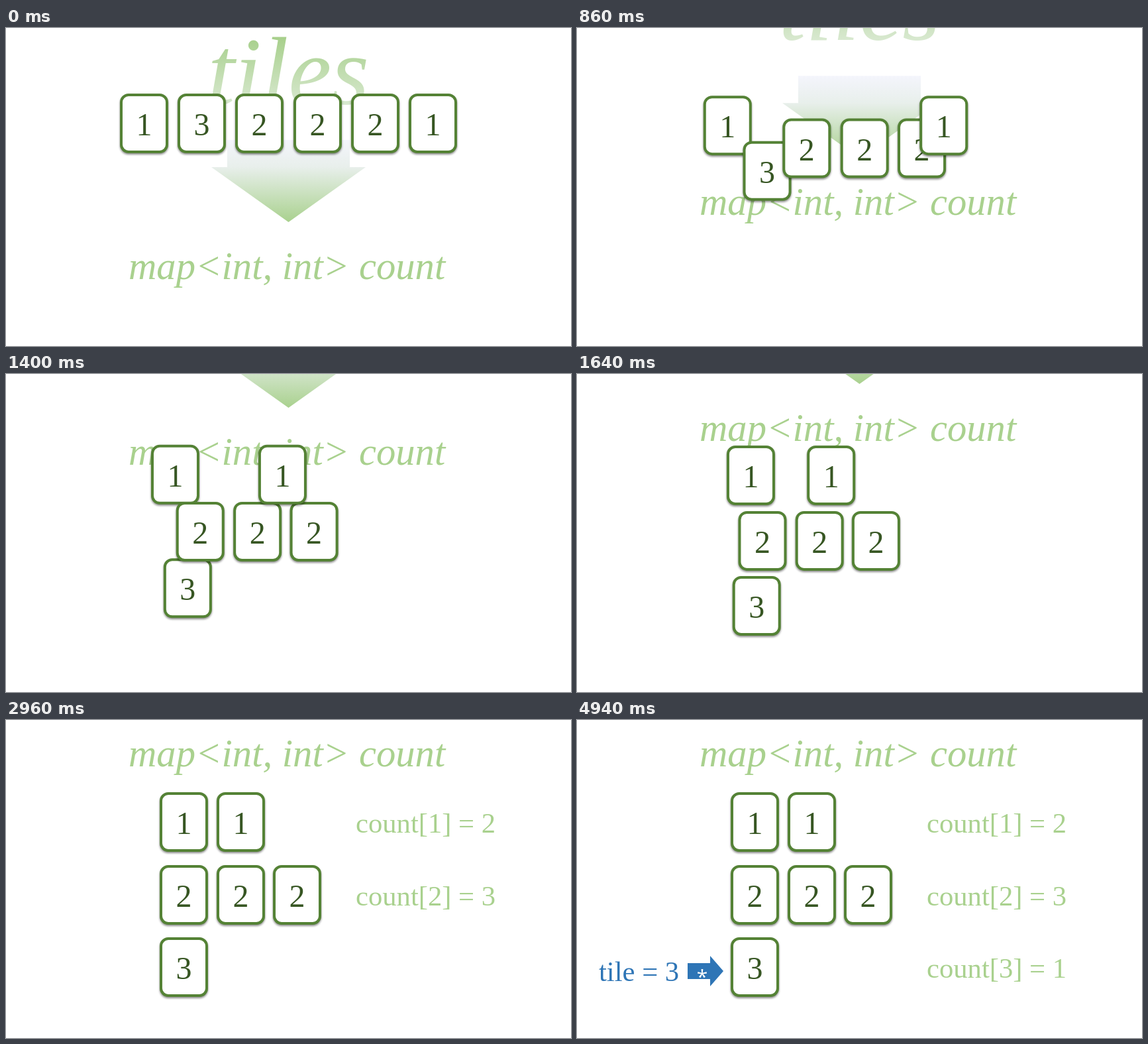
Write an HTML page that moves like this. It is 853x480 px and loops after 7480 ms.

```html
<!DOCTYPE html>
<html lang="en">
<head>
<meta charset="utf-8">
<title>Counting tiles</title>
<style>
  html, body { margin: 0; width: 100%; height: 100%; overflow: hidden; background: #fff; }
  svg { display: block; font-family: "Liberation Serif", "Times New Roman", serif; }
  .heading { font-style: italic; }
  .soft { fill: #a9d18e; }
  .blue { fill: #2e75b6; }
  .label { font-size: 42.65px; white-space: pre; }
  .tile { filter: drop-shadow(0 2px 1.5px rgba(0, 0, 0, .45)); }
  .tile rect { fill: #fff; stroke: #548235; stroke-width: 4; }
  .tile text { fill: #375623; font-size: 48px; text-anchor: middle; }
  .star { fill: #fff; font: 30px "Open Sans", sans-serif; text-anchor: middle; }
</style>
</head>
<body>
<svg id="stage" width="853" height="480" xmlns="http://www.w3.org/2000/svg">
  <defs>
    <linearGradient id="titleFill" gradientUnits="userSpaceOnUse" x1="0" y1="12" x2="0" y2="117">
      <stop offset="0" stop-color="#a6cf8a"/>
      <stop offset="1" stop-color="#d9e9d1"/>
    </linearGradient>
    <linearGradient id="arrowFill" x1="0" y1="0" x2="0" y2="1">
      <stop offset="0" stop-color="#f4f5fc"/>
      <stop offset=".33" stop-color="#e8efeb"/>
      <stop offset="1" stop-color="#a9d18e"/>
    </linearGradient>
  </defs>
  <g id="scroller" class="heading">
    <text x="304.8" y="114.5" font-size="146" fill="url(#titleFill)">tiles</text>
    <path d="M334 169H519V210H543L426.5 293L310 210H334Z" fill="url(#arrowFill)"/>
    <text class="soft" x="185" y="379" font-size="58.65">map&lt;int, int&gt; count</text>
  </g>
  <g id="tiles"></g>
  <g id="counts"></g>
  <g id="pointer">
    <text id="pointerText" class="label blue" x="33" y="15"></text>
    <path class="blue" d="M167 -12H201V-23L221 0L201 23V12H167Z"/>
    <text class="star" x="189" y="18.5">*</text>
  </g>
</svg>
<script>
const LOOP = 7480, STEP = 60, MOVE_START = 500, MOVE_STEPS = 29.8;
const $ = id => document.getElementById(id);

// Digit, then start and end of the top left corner, from back to front
const tiles = [
  [1, 172, 99, 232, 109],
  [3, 259, 99, 232, 328],
  [2, 346, 99, 232, 219],
  [2, 434, 99, 318, 219],
  [2, 521, 99, 403, 219],
  [1, 608, 99, 318, 109]
];
const counts = [
  { at: 2360, y: 170, text: "count[1] = 2" },
  { at: 2960, y: 280, text: "count[2] = 3" },
  { at: 3490, y: 389, text: "count[3] = 1" }
];
const pointerStops = [
  { at: 3950, y: 155 },
  { at: 4480, y: 263 },
  { at: 4940, y: 379 }
];

$("tiles").innerHTML = tiles.map(([digit]) =>
  `<g class="tile"><rect x="2" y="2" width="69" height="86" rx="11"/>
   <text x="36.5" y="63">${digit}</text></g>`).join("");
$("counts").innerHTML = counts.map(({ y, text }) =>
  `<text class="label soft" x="528" y="${y}">${text}</text>`).join("");

const lerp = (a, b, p) => a + (b - a) * p;
const bezier = (a, b, s) => 3 * a * s * (1 - s) ** 2 + 3 * b * s * s * (1 - s) + s ** 3;
const moveTo = (node, x, y) => node.setAttribute("transform", `translate(${x} ${y})`);
const show = (node, on) => node.setAttribute("visibility", on ? "visible" : "hidden");

function ease(u) {
  let low = 0, high = 1;
  for (let i = 0; i < 24; i++) {
    const mid = (low + high) / 2;
    if (bezier(.245, .378, mid) < u) low = mid; else high = mid;
  }
  return bezier(.1, 1, high);
}

function progress(t) {
  const step = Math.floor((t - MOVE_START) / STEP) + 1;
  if (step <= 0) return 0;
  return step >= MOVE_STEPS ? 1 : ease(step / MOVE_STEPS);
}

function render(t) {
  const p = progress(t);
  moveTo($("scroller"), 0, -309 * p);
  tiles.forEach(([, x0, y0, x1, y1], i) =>
    moveTo($("tiles").children[i], lerp(x0, x1, p), lerp(y0, y1, p)));
  counts.forEach(({ at }, i) => show($("counts").children[i], t >= at));

  const reached = pointerStops.filter(stop => t >= stop.at).length;
  show($("pointer"), reached > 0);
  if (reached) {
    moveTo($("pointer"), 0, pointerStops[reached - 1].y);
    $("pointerText").textContent = `tile = ${reached}`;
  }
}

const start = performance.now();
function tick() {
  render((performance.now() - start) % LOOP);
  requestAnimationFrame(tick);
}
tick();
</script>
</body>
</html>
```
